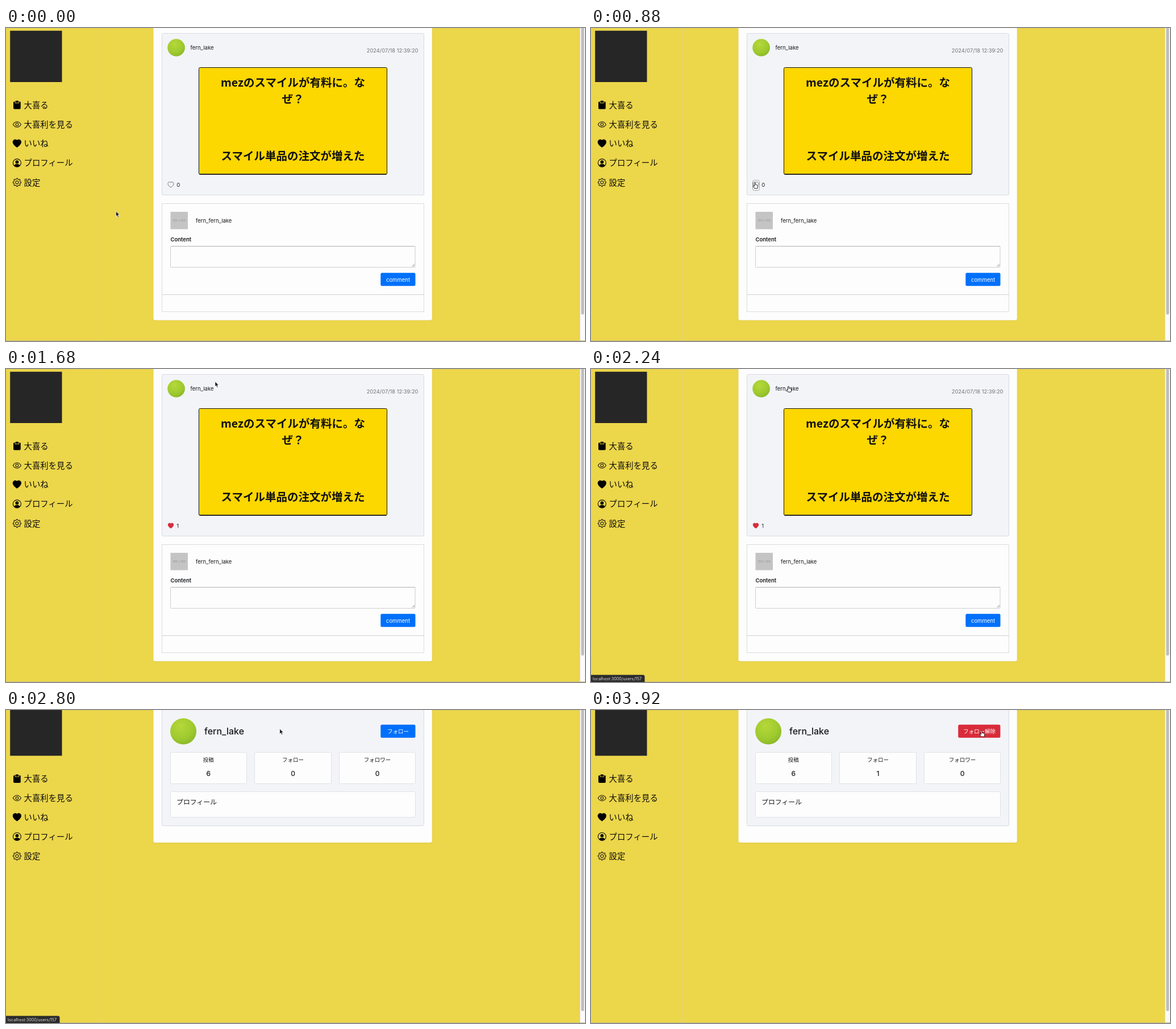
These frames come from a looping animation (1019 px wide and 550 px high, 4320 ms). An HTML page:

```html
<!DOCTYPE html>
<html lang="ja">
<head>
<meta charset="utf-8">
<title>Post and follow demo</title>
<style>
html, body { margin: 0; width: 100%; height: 100%; overflow: hidden; background: #ecd64a; }
svg { display: block; width: 1019px; height: 550px; }
text { font-family: Inter, "Noto Sans CJK JP", "Noto Sans CJK", sans-serif; font-size: 9.5px; fill: #16181b; }
.mid { text-anchor: middle; }
.menu text { font-size: 14.4px; fill: #0c0c0c; }
.joke text { font-family: "Noto Sans CJK JP", "Noto Sans CJK", sans-serif; font-size: 19.5px; font-weight: 700; text-anchor: middle; fill: #111; }
.count { font-size: 12px; font-weight: 500; text-anchor: middle; }
.card { fill: #fdfdfd; }
.shade { fill: #c9b744; opacity: .35; }
.panel { fill: #f3f4f8; stroke: #d8dbe0; }
.box { fill: #fdfdfd; stroke: #dfe2e6; }
.btn { fill: #fff; text-anchor: middle; }
#follow { paint-order: stroke; }
</style>
</head>
<body>
<svg viewBox="0 0 1019 550">
  <defs>
    <radialGradient id="grass" cx=".4" cy=".3" r=".8">
      <stop offset="0" stop-color="#b5d83a"/>
      <stop offset=".6" stop-color="#9fca2f"/>
      <stop offset="1" stop-color="#84b428"/>
    </radialGradient>
    <path id="love" d="M8 1.314C12.438-3.248 23.534 4.735 8 15-7.534 4.736 3.562-3.248 8 1.314z"/>
  </defs>

  <rect width="1019" height="550" fill="#ecd64a"/>
  <path d="M161.2 0V550" stroke="#e6d27a" stroke-width="1.2"/>
  <path d="M0 .5H1010" stroke="#d8c660" opacity=".6"/>

  <g id="menu" class="menu">
    <rect x="7.2" y="4.8" width="91.3" height="90.2" fill="#262626"/>
    <g transform="translate(11.8 127.8) scale(.95)">
      <rect x="1.3" y="1.5" width="13.4" height="14" rx="1.8"/>
      <path d="M4.5 1V4.2H11.5V1" fill="none" stroke="#ecd64a"/>
      <rect x="5.2" width="5.6" height="3.4" rx="1"/>
    </g>
    <g transform="translate(11.8 161.8) scale(.95)" fill="none" stroke="#111" stroke-width="1.1">
      <path d="M.6 8Q3.6 3 8 3T15.4 8Q12.4 13 8 13T.6 8Z"/>
      <circle cx="8" cy="8" r="2.5"/>
    </g>
    <use href="#love" transform="translate(11.8 195.8) scale(.95)"/>
    <g transform="translate(11.8 229.5) scale(.95)">
      <circle cx="8" cy="8" r="7.4" fill="none" stroke="#111" stroke-width="1.2"/>
      <circle cx="8" cy="6.2" r="3"/>
      <path d="M2.6 12.6Q4 10 8 10T13.4 12.6Q11.4 15.2 8 15.2T2.6 12.6Z"/>
    </g>
    <g transform="translate(19.4 271.3)" fill="none" stroke="#111" stroke-width="1.05" stroke-linejoin="round">
      <path id="gear"/>
      <circle r="2.6"/>
    </g>
    <text x="31.5" y="140.5">大喜る</text>
    <text x="31.5" y="174.5">大喜利を見る</text>
    <text x="31.5" y="208.3">いいね</text>
    <text x="31.5" y="242.3">プロフィール</text>
    <text x="31.5" y="276.5">設定</text>
  </g>

  <g id="post">
    <rect class="shade" x="259.3" y="-10" width="491" height="524.6" rx="3"/>
    <rect class="card" x="259.5" y="-10" width="490.3" height="523.6" rx="3"/>
    <rect class="panel" x="274.5" y="9.5" width="461" height="284" rx="2"/>
    <circle cx="299.6" cy="34.5" r="15.3" fill="url(#grass)"/>
    <text x="324.5" y="38.3">fern_lake</text>
    <text x="725.5" y="43.2" text-anchor="end" style="font-size:9.3px;fill:#707479">2024/07/18 12:39:20</text>
    <g class="joke">
      <rect x="339.5" y="69.5" width="331" height="187.5" rx="2" fill="#fdd700" stroke="#111"/>
      <path d="M340.5 257H669.5" stroke="#111" stroke-width="1.6"/>
      <text x="505" y="102.5">mezのスマイルが有料に。な</text>
      <text x="505" y="132">ぜ？</text>
      <text x="505" y="232">スマイル単品の注文が増えた</text>
    </g>
    <rect id="focus" x="284.5" y="267.5" width="12" height="18" rx="3" fill="#fafafa" stroke="#a2a2a2"/>
    <use id="like" href="#love" transform="translate(284.9 270.6) scale(.64)"/>
    <text id="likes" x="300.3" y="279.2"></text>

    <rect x="274.5" y="308.5" width="461" height="190" fill="#fdfdfd" stroke="#dcdcdc"/>
    <path d="M274.5 468.5H735.5" stroke="#d0d0d0"/>
    <rect x="289.5" y="323" width="30.5" height="30.5" fill="#c4c4c4"/>
    <text class="mid" x="304.7" y="340.3" style="font-size:5px;fill:#929292">100 x 100</text>
    <text x="334" y="342.3">fern_fern_lake</text>
    <text x="289.5" y="374.6" style="font-weight:600">Content</text>
    <rect x="289.5" y="383.5" width="430.5" height="37" rx="1" fill="#fdfdfd" stroke="#cdcdcd"/>
    <path d="M290 383.5H720" stroke="#b2b2b2"/>
    <path d="M714.5 419L719 414.5M717 419L719 417" stroke="#777" stroke-width=".8"/>
    <rect x="659.3" y="430.3" width="61.2" height="23" rx="2.5" fill="#0070fb"/>
    <text class="btn" x="690" y="445.5">comment</text>
  </g>

  <g id="profile">
    <rect class="shade" x="259.3" y="-10" width="491" height="244" rx="3"/>
    <rect class="card" x="259.5" y="-10" width="490.3" height="243" rx="3"/>
    <rect class="panel" x="274.5" y="-9.5" width="461" height="213" rx="2"/>
    <circle cx="312.1" cy="37.4" r="23" fill="url(#grass)"/>
    <text x="349" y="43.2" style="font-size:16px;font-weight:500">fern_lake</text>
    <rect id="follow" y="25.7" height="23.1" rx="2.5"/>
    <text id="action" class="btn" y="41"></text>
    <rect class="box" x="289.5" y="74.5" width="134" height="55" rx="2"/>
    <rect class="box" x="437.5" y="74.5" width="135" height="55" rx="2"/>
    <rect class="box" x="586.5" y="74.5" width="134" height="55" rx="2"/>
    <text class="mid" x="356.3" y="91">投稿</text>
    <text class="mid" x="505" y="91">フォロー</text>
    <text class="mid" x="653.5" y="91">フォロワー</text>
    <text class="count" x="356.3" y="116.3">6</text>
    <text class="count" x="505" y="116.3" id="following"></text>
    <text class="count" x="653.5" y="116.3">0</text>
    <rect class="box" x="289.5" y="143.5" width="431" height="45" rx="2"/>
    <text x="300" y="165.8" style="font-size:11.9px">プロフィール</text>
  </g>

  <rect x="1010" width="9" height="550" fill="#fafafa"/>
  <path d="M1010.5 0V550" stroke="#e6e6e6"/>
  <rect id="thumb" x="1012.3" y="-6" width="5" rx="2.5" fill="#bdbdbd"/>
  <path d="M0 549.5H1019" stroke="#c9bd7c"/>

  <g id="status">
    <path d="M0 537.5H91.5Q94.5 537.5 94.5 540.5V550H0Z" fill="#2b2b2b"/>
    <text x="3" y="546.5" style="font-size:7.2px;fill:#dedede">localhost:3000/users/157</text>
  </g>

  <g id="cursor">
    <path id="arrow" d="M0 0V9L2 7.2L3.5 10.4L5 9.7L3.6 6.6H6.3Z" fill="#111" stroke="#fff" stroke-width=".7"/>
    <path id="hand" transform="translate(-.4 -.3) scale(.93)" d="M-1.2 .8Q0-.8 1 .8V4.2Q2.2 3.4 3 4.4Q4.4 4 4.6 5.4Q5.8 5.4 5.6 7L4.6 11H-.8L-3.4 7.2Q-3.6 5.8-2 6.2L-1.2 7Z" fill="#fff" stroke="#111" stroke-linejoin="round"/>
  </g>
</svg>
<script>
const LOOP = 4320, STEP = 80;
const $ = id => document.getElementById(id);
const show = (id, on) => { $(id).style.display = on ? '' : 'none'; };
const set = (id, attrs) => {
  for (const name in attrs) $(id).setAttribute(name, attrs[name]);
};

// time, x, y of the pointer's hot spot
const path = [
  [0, 193.5, 322], [560, 193.5, 322], [840, 289, 272], [1120, 289, 272],
  [1600, 368, 22], [1680, 368, 22], [1920, 348, 30.5], [2560, 348, 30.5],
  [3120, 688, 37], [LOOP, 688, 37]
];
const ease = k => k * k * (3 - 2 * k);
const within = (t, a, b) => t >= a && t < b;

function pointer(t) {
  const i = path.findIndex(p => p[0] > t);
  const [t0, x0, y0] = path[i - 1], [t1, x1, y1] = path[i];
  const k = ease((t - t0) / (t1 - t0));
  return [x0 + (x1 - x0) * k, y0 + (y1 - y0) * k];
}

function gear() {
  const points = [];
  for (let i = 0; i < 32; i++) {
    const r = i % 4 < 2 ? 7.1 : 5.6;
    const a = (i - 0.5) * Math.PI / 16;
    points.push((r * Math.sin(a)).toFixed(2) + ' ' + (-r * Math.cos(a)).toFixed(2));
  }
  return 'M' + points.join('L') + 'Z';
}

function drawFollow(t) {
  const done = t >= 3520, pressed = within(t, 3280, 3520);
  const color = done ? '#d92c3a' : pressed ? '#0a53cc' : t >= 3120 ? '#0069d9' : '#0070fb';
  set('follow', {
    x: done ? 646.2 : 659.3,
    width: done ? 74.2 : 61.2,
    fill: color,
    stroke: pressed ? '#7db5f8' : 'none',
    'stroke-width': 3.6
  });
  set('action', { x: done ? 683.4 : 690 });
  $('action').textContent = done ? 'フォロー解除' : 'フォロー';
  $('following').textContent = done ? 1 : 0;
}

function draw(t) {
  const profile = t >= 2320, liked = t >= 1040;
  show('post', !profile);
  show('profile', profile);
  set('menu', { transform: `translate(0 ${profile ? -14.6 : 0})` });
  set('thumb', { height: profile ? 535 : 509.5 });

  show('focus', within(t, 880, 1040));
  set('like', {
    fill: liked ? '#d62f3c' : 'none',
    stroke: liked ? 'none' : '#555',
    'stroke-width': 1.2
  });
  $('likes').textContent = liked ? 1 : 0;
  drawFollow(t);

  show('status', within(t, 2000, 2880));
  const hand = within(t, 800, 1200) || within(t, 1840, 2640) || t >= 3040;
  show('hand', hand);
  show('arrow', !hand);
  set('cursor', { transform: `translate(${pointer(t)})` });
}

set('gear', { d: gear() });
const start = performance.now();
function tick() {
  const t = (performance.now() - start) % LOOP;
  draw(Math.floor(t / STEP) * STEP);
  requestAnimationFrame(tick);
}
tick();
</script>
</body>
</html>
```
